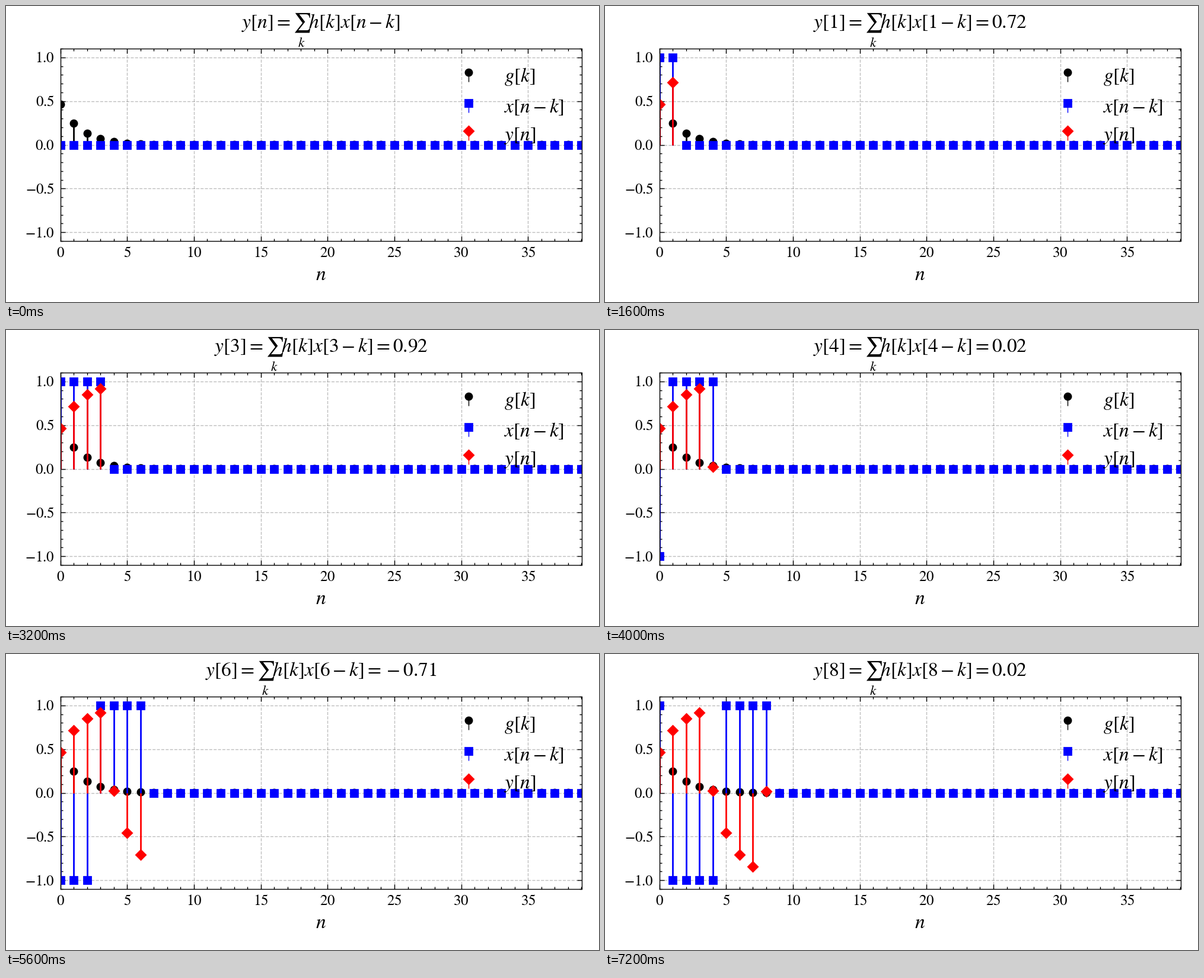
A matplotlib script that plays this animation: 1000 px wide and 500 px high, repeating every 8000 ms.

```python
import numpy as np
import matplotlib.pyplot as plt
from matplotlib.animation import FuncAnimation
from matplotlib.ticker import AutoMinorLocator, FormatStrFormatter, MultipleLocator

COUNT = 40
FRAMES = 10
FRAME_MS = 800
DECAY = 0.533
HALF_PERIOD = 4

plt.rcParams.update({
    "mathtext.fontset": "stix",
    "font.family": "Liberation Serif",
    "font.size": 12,
    "lines.linewidth": 0.5,
    "axes.linewidth": 0.5,
    "grid.linewidth": 0.5,
})

k = np.arange(COUNT)
impulse = (1 - DECAY) * DECAY ** k
square = np.where(k // HALF_PERIOD % 2 == 0, 1.0, -1.0)
response = np.convolve(impulse, square)[:COUNT]

fig = plt.figure(figsize=(5, 2.5), dpi=200, facecolor="white")
ax = fig.add_axes([0.0915, 0.206, 0.879, 0.65])
ax.set(xlim=(0, COUNT - 1), ylim=(-1.1, 1.1))
ax.set_xlabel("$n$", fontsize=12)
title = ax.set_title("", fontsize=12)

for axis, step, fmt in ((ax.xaxis, 5, "$%d$"), (ax.yaxis, 0.5, "$%.1f$")):
    axis.set_major_locator(MultipleLocator(step))
    axis.set_minor_locator(AutoMinorLocator(5))
    axis.set_major_formatter(FormatStrFormatter(fmt))
ax.tick_params(which="both", direction="in", top=True, right=True, width=0.5)
ax.tick_params(which="major", length=3, labelsize=9)
ax.tick_params(which="minor", length=1.5)
ax.grid(color="black", alpha=0.25, linestyle="--")
ax.set_axisbelow(True)


def add_stems(values, color, marker, label):
    stems = ax.stem(k, values, linefmt=color, markerfmt=marker, basefmt=" ", label=label)
    stems.markerline.set(color=color, markersize=4, markeredgewidth=1)
    stems.stemlines.set(color=color, linewidth=1)
    return stems


def set_stems(stems, values):
    stems.markerline.set_ydata(values)
    stems.stemlines.set_segments([[(i, 0), (i, v)] for i, v in zip(k, values)])


add_stems(impulse, "black", "o", "$g[k]$")
shifted = add_stems(np.zeros(COUNT), "blue", "s", "$x[n-k]$")
output = add_stems(np.zeros(COUNT), "red", "D", "$y[n]$")
ax.legend(loc="upper right", frameon=False, fontsize=12, numpoints=1)


def draw(frame):
    n = frame - 1
    set_stems(shifted, np.where(k <= n, square[np.maximum(n - k, 0)], 0.0))
    set_stems(output, np.where(k <= n, response, np.nan))
    index = "n" if n < 0 else str(n)
    result = "" if n < 0 else f" = {response[n]:.2f}"
    title.set_text(rf"$y[{index}] = \sum_k h[k]x[{index}-k]{result}$")
    return shifted.markerline, shifted.stemlines, output.markerline, output.stemlines, title


animation = FuncAnimation(fig, draw, frames=FRAMES, interval=FRAME_MS,
                          repeat=True, repeat_delay=0, blit=False)
plt.show()
```
